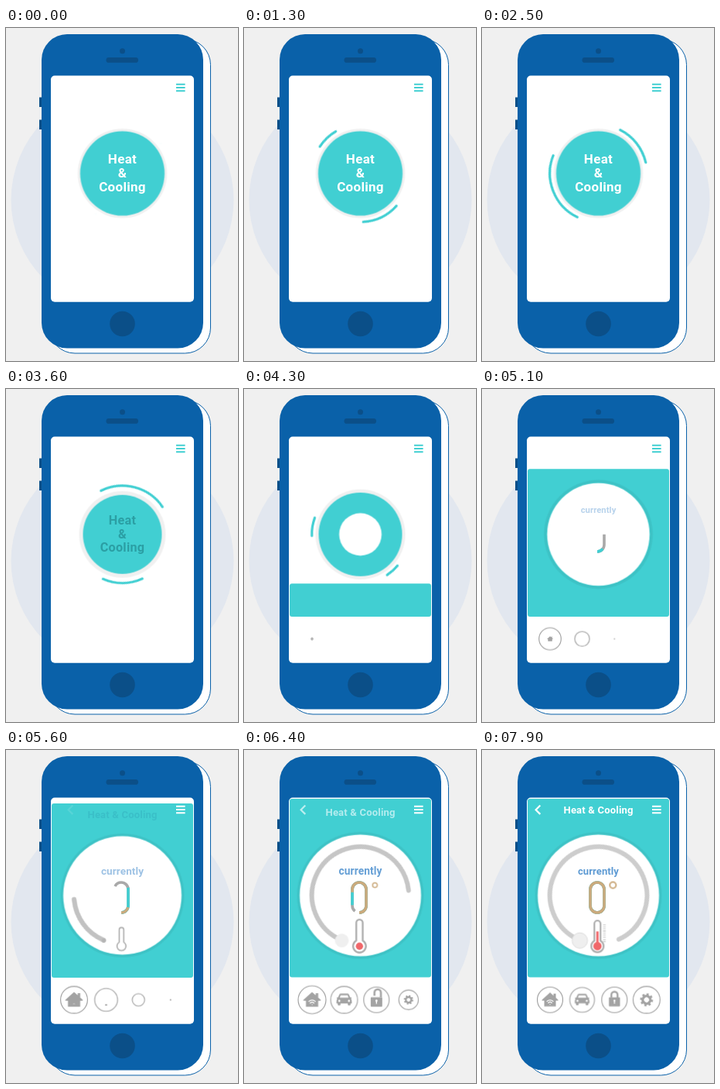
Animation, 300 px wide and 430 px high, one loop 8000 ms. Source, as an HTML page:

```html
<!DOCTYPE html>
<html lang="en">
<head>
<meta charset="utf-8">
<title>Heat &amp; Cooling</title>
<style>
html, body { margin: 0; width: 100%; height: 100%; overflow: hidden; background: #f0f0f0; }
svg { display: block; width: 300px; height: 430px; }
text { font: 700 13px Roboto, "Open Sans", sans-serif; text-anchor: middle; }
.anim, .anim * { animation: 8s linear infinite; }

.blue { fill: #0a61a9; }
.navy { fill: #0b4f88; }
.teal { fill: #41cfd2; }
.gray { fill: #a3a3a3; }
.line { fill: none; }
.round { stroke-linecap: round; stroke-linejoin: round; }

/* Button and dial */
.anim .shadow { fill: rgba(0, 0, 0, .06); animation-name: shadow; }
.anim .disc { animation-name: disc; }
.anim .face { fill: #fff; animation-name: face; }
.anim .label { fill: #fff; animation-name: label; }
.label text { font-size: 17px; letter-spacing: .3px; }
@keyframes shadow {
  0%, 39% { r: 57.8px } 45% { r: 56px } 52% { r: 58px } 58.75% { r: 58.6px }
  64% { r: 71px } 70% { r: 80px } 80%, 100% { r: 82px }
}
@keyframes disc {
  0%, 39% { r: 54.6px } 45% { r: 51px } 52%, 58.75% { r: 54px } 64% { r: 67px } 70%, 100% { r: 76px }
}
@keyframes face {
  0%, 48.5% { r: 0 } 53% { r: 24px } 58.75% { r: 50px } 64% { r: 67px } 70% { r: 76.5px } 80%, 100% { r: 78.5px }
}
@keyframes label {
  0%, 39% { fill: #fff; transform: scale(1); opacity: 1 }
  45% { fill: #2c9fa4; transform: scale(.95); opacity: 1 }
  49%, 100% { fill: #2c9fa4; transform: scale(.97); opacity: 0 }
}

/* Loading arcs */
.arc { stroke: #41cfd2; stroke-width: 3.2; }
.anim .arc1 { animation-name: arc1; }
.anim .arc2 { animation-name: arc2; }
@keyframes arc1 {
  0% { transform: rotate(-38deg); stroke-dasharray: 0 360; opacity: 0 }
  .6% { opacity: 1 }
  31.25% { transform: rotate(115.4deg); stroke-dasharray: 86 360 }
  45% { transform: rotate(243.4deg); stroke-dasharray: 82 360 }
  56% { transform: rotate(440deg); stroke-dasharray: 0 360; opacity: 1 }
  56.2%, 100% { transform: rotate(440deg); stroke-dasharray: 0 360; opacity: 0 }
}
@keyframes arc2 {
  0% { transform: rotate(123deg); stroke-dasharray: 0 360; opacity: 0 }
  .6% { opacity: 1 }
  31.25% { transform: rotate(296.4deg); stroke-dasharray: 50.5 360 }
  45% { transform: rotate(425.4deg); stroke-dasharray: 48 360 }
  58.75% { transform: rotate(602.3deg); stroke-dasharray: 7 360 }
  59.8% { transform: rotate(617deg); stroke-dasharray: 0 360; opacity: 1 }
  60%, 100% { transform: rotate(617deg); stroke-dasharray: 0 360; opacity: 0 }
}

/* Panel and header */
.anim .panel { animation-name: panel; }
.anim .menu { stroke: #41cfd2; animation-name: menu; }
.anim .title { letter-spacing: .2px; animation-name: title; }
.anim .back { stroke: #fff; animation-name: back; }
@keyframes panel {
  0%, 51% { y: 294px; height: 0 } 55% { y: 232px; height: 62px } 58.75% { y: 165px; height: 129px }
  62.5% { y: 112px; height: 182px } 67.5% { y: 77px; height: 217px } 70% { y: 69px; height: 225px }
  75% { y: 64.5px; height: 229px } 80%, 100% { y: 63px; height: 230.5px }
}
@keyframes menu { 0%, 67.8% { stroke: #41cfd2 } 68.2%, 100% { stroke: #fff } }
@keyframes title {
  0%, 68% { fill: #41cfd2; opacity: 0; transform: translateY(7px) }
  70% { fill: #3abfc8; opacity: 1; transform: translateY(6px) }
  80% { fill: #b4ecee; transform: translateY(2.4px) }
  90%, 100% { fill: #fff; opacity: 1; transform: none }
}
@keyframes back {
  0%, 68% { opacity: 0; transform: translateX(13px) }
  70% { opacity: .12; transform: translateX(11px) }
  80% { opacity: .65; transform: translateX(4px) }
  90%, 100% { opacity: 1; transform: none }
}

/* Reading */
.anim .now { fill: #5d9ad3; letter-spacing: .1px; animation-name: now; }
.zero { stroke-width: 3.6; }
.anim .z1 { stroke: #a9a9a9; animation-name: z1; }
.anim .z2 { stroke: #41cfd2; animation-name: z2; }
.anim .z3 { stroke: #cbaa7d; animation-name: z3; }
.anim .degree { stroke: #cbaa7d; stroke-width: 2; animation-name: degree; }
@keyframes now {
  0%, 54% { opacity: 0; transform: scale(.5) } 58.75% { opacity: .32; transform: scale(.72) }
  70% { opacity: .6; transform: scale(1.04) } 80% { opacity: .95; transform: scale(1.06) }
  92%, 100% { opacity: 1; transform: none }
}
@keyframes z1 {
  0%, 58% { stroke-dasharray: 0 200 } 58.75% { stroke-dasharray: 2 200 } 70% { stroke-dasharray: 60 200 }
  80% { stroke-dasharray: 94 200 } 83%, 100% { stroke-dasharray: 101 200 }
}
@keyframes z2 {
  0%, 62% { stroke-dasharray: 0 200 } 70% { stroke-dasharray: 38 200 }
  80% { stroke-dasharray: 85 200 } 86%, 100% { stroke-dasharray: 101 200 }
}
@keyframes z3 {
  0%, 67.5% { stroke-dasharray: 0 200 } 70% { stroke-dasharray: 12 200 }
  80% { stroke-dasharray: 68 200 } 90%, 100% { stroke-dasharray: 101 200 }
}
@keyframes degree {
  0%, 75% { transform: scale(0) } 80% { transform: scale(.76) } 86%, 100% { transform: none }
}

/* Gauge and thermometer */
.anim .gauge { stroke-width: 6; animation-name: gauge; }
.anim .knob { animation-name: knob; }
.anim .thermo { animation-name: thermo; }
.anim .bulb { animation-name: bulb; }
.anim .mercury { animation-name: mercury; }
.anim .ticks { animation-name: ticks; }
@keyframes gauge {
  0%, 65.5% { stroke-dasharray: 0 400; stroke: #bdbdbd; opacity: 0 }
  65.7% { opacity: 1 }
  70% { stroke-dasharray: 62 400; stroke: #c2c2c2 }
  80% { stroke-dasharray: 241 400; stroke: #c6c6c6 }
  84% { stroke-dasharray: 293 400 }
  90%, 100% { stroke-dasharray: 312 400; stroke: #cdcdcd; opacity: 1 }
}
@keyframes knob {
  0%, 65.5% { r: 0; fill: #b0b0b0; stroke: #b0b0b0 } 70% { r: 2.4px; fill: #b5b5b5; stroke: #b5b5b5 }
  80% { r: 8.4px; fill: #efefef; stroke: #efefef } 86%, 100% { r: 10px; fill: #efefef; stroke: #dcdcdc }
}
@keyframes thermo {
  0%, 65% { transform: scale(0) } 70% { transform: scale(.73) } 77% { transform: scale(1.05) }
  80% { transform: scale(1.04) } 86%, 100% { transform: none }
}
@keyframes bulb { 0%, 72% { r: 0 } 80% { r: 4.5px } 86%, 100% { r: 5.4px } }
@keyframes mercury { 0%, 80% { transform: scaleY(0) } 92%, 100% { transform: none } }
@keyframes ticks { 0%, 82% { opacity: 0 } 90%, 100% { opacity: 1 } }

/* Bottom icons */
.rim { fill: #fff; stroke: #9c9c9c; stroke-width: 1.1; }
.anim .rim1 { animation-name: rim1; }
.anim .rim2 { animation-name: rim2; }
.anim .rim3 { animation-name: rim3; }
.anim .rim4 { animation-name: rim4; }
@keyframes rim1 {
  0%, 53.1% { r: 0 } 58.75% { r: 10px } 64% { r: 14.5px } 70% { r: 17.4px } 80% { r: 18px } 88%, 100% { r: 16.5px }
}
@keyframes rim2 {
  0%, 58% { r: 0 } 58.75% { r: .6px } 64% { r: 10px } 70% { r: 14.8px } 75% { r: 17px } 80% { r: 17.4px } 92%, 100% { r: 16px }
}
@keyframes rim3 {
  0%, 63.5% { r: 0 } 70% { r: 8px } 75% { r: 13.5px } 80% { r: 16.5px } 87% { r: 17.5px } 98%, 100% { r: 16.5px }
}
@keyframes rim4 {
  0%, 69.6% { r: 0 } 70% { r: .4px } 75% { r: 8px } 80% { r: 12.6px } 86% { r: 16.5px } 92% { r: 18px } 98%, 100% { r: 17.4px }
}
.anim .house { animation-name: house; }
.anim .wifi { animation-name: wifi; }
.anim .car { animation-name: car; }
.anim .lock { animation-name: lock; }
.anim .shackle { animation-name: shackle; }
.anim .gear { animation-name: gear; }
@keyframes house {
  0%, 61% { transform: scale(0) } 69% { transform: scale(1.06) } 80% { transform: scale(1.06) } 88%, 100% { transform: none }
}
@keyframes wifi { 0%, 68% { transform: scale(0) } 70% { transform: scale(.25) } 79%, 100% { transform: none } }
@keyframes car {
  0%, 69% { transform: translateY(7px) scale(0) } 70% { transform: translateY(6.5px) scale(.15) }
  78%, 84% { transform: scale(1.04) } 92%, 100% { transform: none }
}
@keyframes lock { 0%, 71% { transform: scale(0) } 79%, 84% { transform: scale(1.04) } 92%, 100% { transform: none } }
@keyframes shackle { 0%, 81% { transform: translate(1.5px, -2.6px) } 87%, 100% { transform: none } }
@keyframes gear {
  0%, 69.6% { transform: scale(0) rotate(-90deg) } 80% { transform: scale(.73) rotate(0deg) }
  92% { transform: scale(1.03) rotate(45deg) } 98%, 100% { transform: scale(1) rotate(45deg) }
}
</style>
</head>
<body>
<svg viewBox="0 0 300 430">
  <defs>
    <path id="zero" class="line" pathLength="100" d="M149 210a9 9 0 0 0 9-9v-21a9 9 0 0 0-18 0v21a9 9 0 0 0 9 9z"/>
  </defs>

  <!-- Phone -->
  <circle cx="150.5" cy="222" r="144" fill="#e2e7ef"/>
  <rect x="56" y="14.5" width="208.5" height="405.5" rx="33" fill="#fff" stroke="#0a61a9"/>
  <path class="navy" d="M43 89.500h4v12.500h-4zM43 118.500h4v12.500h-4z"/>
  <rect class="blue" x="46" y="8" width="209" height="405.500" rx="33"/>
  <circle class="navy" cx="150.500" cy="29.700" r="3.500"/>
  <rect class="navy" x="129.500" y="38" width="41.500" height="6.800" rx="3.400"/>
  <circle class="navy" cx="150.500" cy="382" r="16.300"/>
  <rect x="58" y="61.500" width="185" height="292.300" rx="5" fill="#fff"/>

  <g class="anim">
    <rect class="panel teal" x="59" y="294" width="183" height="0" rx="3"/>
    <path class="menu" stroke-width="2" d="M220 72.700h11.600M220 77h11.600M220 81.300h11.600"/>
    <text class="title" x="150.600" y="82.300">Heat &amp; Cooling</text>
    <path class="back line" stroke-width="2.200" d="M75.300 71.500l-5.700 5.700 5.700 5.700"/>

    <g transform="translate(150.500 187.700)">
      <circle class="shadow" r="57.800"/>
      <circle class="disc teal" r="54.600"/>
      <circle class="face" r="0"/>
      <g class="label">
        <text y="-12.900">Heat</text>
        <text y="5.300">&amp;</text>
        <text y="23.300">Cooling</text>
      </g>
      <circle class="arc arc1 line round" r="62.800" pathLength="360"/>
      <circle class="arc arc2 line round" r="62.800" pathLength="360"/>
      <g transform="rotate(113)">
        <circle class="gauge line round" r="62.700" pathLength="360"/>
      </g>
      <circle class="knob" cx="-24" cy="58.300" r="0"/>
    </g>

    <g transform="translate(150.500 156)"><text class="now" y="4.500">currently</text></g>
    <use href="#zero" class="zero z1"/>
    <use href="#zero" class="zero z2"/>
    <use href="#zero" class="zero z3"/>
    <g transform="translate(169.300 174.500)"><circle class="degree line" r="4"/></g>

    <g transform="translate(149.300 253.300)">
      <g class="thermo">
        <path d="M-4-7V-29a4 4 0 0 1 8 0V-7A8 8 0 1 1-4-7z" fill="#fff" stroke="#adadad" stroke-width="2.200"/>
        <path class="mercury" d="M0 0V-19" stroke="#f0676a" stroke-width="3"/>
        <circle class="bulb" r="0" fill="#f0676a"/>
      </g>
      <path class="ticks" d="M9-28V-5" stroke="#b5b5b5" stroke-width="3.400" stroke-dasharray=".8 1.900"/>
    </g>

    <!-- Home -->
    <g transform="translate(88 322.600)">
      <circle class="rim rim1" r="0"/>
      <g class="house gray">
        <path d="M0-9.500L10.500 0V1H7.500V8.500H-7.500V1H-10.500V0zM4.500-8h3v5h-3z"/>
        <g transform="translate(0 5.500)">
          <g class="wifi line round" stroke="#fff" stroke-width="1.100">
            <path d="M-4-3.500a5.700 5.700 0 0 1 8 0M-2.300-1.500a3.300 3.300 0 0 1 4.600 0"/>
            <circle r=".6" cy=".4" fill="#fff" stroke="none"/>
          </g>
        </g>
      </g>
    </g>

    <!-- Car -->
    <g transform="translate(129.500 322.600)">
      <circle class="rim rim2" r="0"/>
      <g class="car">
        <path class="gray" d="M-9.500-2.500l2-.6 1.500-3.400q.5-1.200 2-1.200h8q1.500 0 2 1.200l1.500 3.400 2 .6-.9 1.500q.9 1 .9 2.500v3h-1.500v1.500q0 1-1 1h-1.500q-1 0-1-1v-1.500h-9v1.500q0 1-1 1h-1.500q-1 0-1-1v-1.500h-1.500v-3q0-1.500.9-2.500z"/>
        <path fill="#fff" d="M-5.500-2.700l1.200-3h8.600l1.200 3z"/>
        <circle cx="-6" cy="1.300" r="1.300" fill="#fff"/>
        <circle cx="6" cy="1.300" r="1.300" fill="#fff"/>
      </g>
    </g>

    <!-- Lock -->
    <g transform="translate(171.300 322.600)">
      <circle class="rim rim3" r="0"/>
      <g class="lock">
        <path class="shackle line" d="M-4-2.500v-4a4 4 0 0 1 8 0v6" stroke="#a3a3a3" stroke-width="2.400"/>
        <rect class="gray" x="-7.200" y="-3.300" width="14.400" height="11.800" rx="1"/>
        <path d="M0 1v4" stroke="#fff" stroke-width="1.300"/>
        <circle cy="1" r="1.300" fill="#fff"/>
      </g>
    </g>

    <!-- Settings -->
    <g transform="translate(212.800 322.600)">
      <circle class="rim rim4" r="0"/>
      <g class="gear line" stroke="#a3a3a3">
        <circle r="4.900" stroke-width="3.400"/>
        <circle r="7" stroke-width="2.800" pathLength="16" stroke-dasharray="1 1"/>
      </g>
    </g>
  </g>
</svg>
</body>
</html>
```
